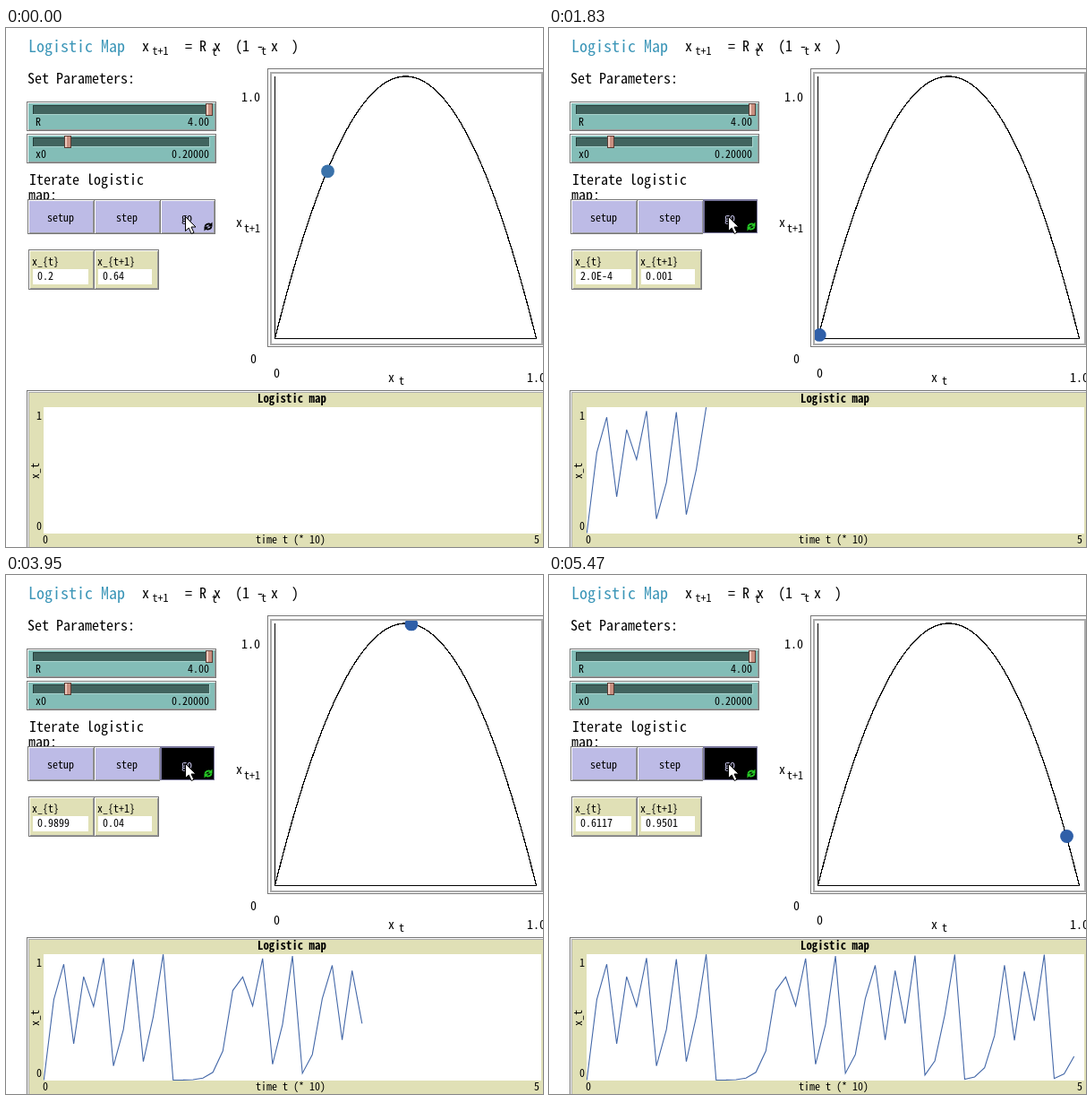
An HTML page that plays this animation: 600 px wide and 579 px high, repeating every 5.54 s.

```html
<!DOCTYPE html>
<html lang="en">
<head>
<meta charset="utf-8">
<title>Logistic map</title>
<style>
  html, body { margin: 0; width: 100%; height: 100%; overflow: hidden; background: #fff; }
  svg { display: block; width: 600px; height: 579px; }
  text { white-space: pre; }
  rect, .crisp { shape-rendering: crispEdges; }
</style>
</head>
<body>
<svg id="stage" viewBox="0 0 600 579"></svg>
<script>
const LOOP = 5540, PRESS = 330, CATCH_UP = 4640;
const FONT = '"Noto Sans Mono CJK SC", "Liberation Mono", monospace';

const f = x => 4 * x * (1 - x);
const xs = [0.2];
while (xs.length < 53) xs.push(f(xs[xs.length - 1]));

const viewX = x => 300.5 + 292 * x;
const viewY = y => 346.5 - 292.5 * y;
const plotX = t => 42.3 + 11.11 * t;
const plotY = y => 563.5 - 140.3 * y;

// Advance of one character, in em
const pen = document.createElement('canvas').getContext('2d');
pen.font = '100px ' + FONT;
const advance = pen.measureText('0').width / 100;

const rect = (x, y, w, h, fill, more = '') =>
  `<rect x="${x}" y="${y}" width="${w}" height="${h}" fill="${fill}" ${more}/>`;
const text = (x, y, s, charW = 6, more = '') =>
  `<text x="${x}" y="${y}" font-size="${charW / advance}" ${more}>${s}</text>`;
const panel = (x, y, w, h, fill) =>
  rect(x, y, w, h, '#777') + rect(x + 1, y + 1, w - 2, h - 2, '#fff') +
  rect(x + 2, y + 2, w - 3, h - 3, '#999') + rect(x + 2, y + 2, w - 4, h - 4, fill);

const slider = (y, name, value, thumb) =>
  panel(23, y, 212, 33, '#83bdb7') +
  rect(30, y + 4, 198, 11, '#a9d3ce') + rect(30, y + 4, 197, 10, '#243c39') +
  rect(31, y + 5, 196, 9, '#41645f') +
  rect(thumb, y + 2, 8, 14, '#573b34') + rect(thumb + 1, y + 3, 6, 12, '#c98f80') +
  rect(thumb + 1, y + 3, 2, 12, '#edc9bd') +
  text(33, y + 27, name) + text(227, y + 27, value, 6, 'text-anchor="end"');

const button = (x, w, label, labelX) =>
  panel(x, 191, w, 39, '#bdbbe6') + text(labelX, 216, label);

const monitor = (x, w, label, id, fieldW) =>
  panel(x, 247, w, 45, '#e0e0b6') + text(x + 4, 265, label) +
  rect(x + 5, 269, fieldW, 17, '#fff') + text(x + 10, 281, '', 6, `id="${id}"`);

const arrow = '<path d="M222.5 221.500a4 3.500 0 0 1 6-2.500" fill="none" stroke-width="1.8"/>' +
  '<path d="M230.500 216.500v5h-5z" stroke="none"/>';

let curve = '';
for (let i = 0; i <= 100; i++) curve += `${viewX(i / 100)},${viewY(f(i / 100))} `;

const stage = document.getElementById('stage');
stage.style.fontFamily = FONT;
stage.innerHTML =
  rect(0, 0, 600, 579, '#fff') +
  text(25, 27, 'Logistic Map', 9, 'fill="#3c96b8"') +
  text(152, 26, 'x', 8) + text(163.5, 30, 't+1') + text(200, 26, '= R', 8) +
  text(230, 31, 't') + text(232, 26, 'x', 8) + text(256, 26, '(1', 8) +
  text(280, 26, '-', 8) + text(285, 30, 't') + text(296, 26, 'x', 8) + text(319, 26, ')', 8) +
  text(24, 62, 'Set Parameters:', 8) +
  slider(82, 'R', '4.00', 223) + slider(118, 'x0', '0.20000', 65) +
  text(26, 175, 'Iterate logistic', 8) + text(25, 192, 'map:', 8) +
  button(24, 75, 'setup', 46) + button(98, 75, 'step', 123) + button(172, 62, '', 196) +
  `<g id="pressed">${rect(172, 191, 62, 39, '#fff')}${rect(172, 191, 61, 38, '#77759a')}
    ${rect(174, 193, 58, 35, '#000')}</g>` +
  text(196, 216, 'go', 6, 'id="go"') +
  `<g id="cycle">${arrow}<g transform="rotate(180 226 221.5)">${arrow}</g></g>
  <path d="M200.5 210.500v16l3.700-3.500 3 6.500 2.800-1.300-3-6.200h5z" fill="#fff" stroke="#000"/>` +
  monitor(25, 74, 'x_{t}', 'now', 62) + monitor(98, 73, 'x_{t+1}', 'next', 60) +

  // view with the parabola
  rect(292, 45, 308, 311, '#777') + rect(293, 46, 307, 309, '#fff') +
  rect(295, 49, 305, 305, '#aaa') + rect(297, 51, 301, 301, '#fff') +
  `<path class="crisp" d="M300.5 54V346.500H593" fill="none" stroke="#000"/>
  <polyline class="crisp" points="${curve}" fill="none" stroke="#000" stroke-width="1.3"/>
  <clipPath id="view"><rect x="297" y="51" width="301" height="301"/></clipPath>
  <g clip-path="url(#view)"><circle id="dot" r="7.4"/></g>` +
  text(263, 82, '1.0', 7) + text(257, 222, 'x', 7) + text(266, 228, 't+1') +
  text(273, 374, '0', 7) + text(299, 390, '0', 7) +
  text(427, 395, 'x', 7) + text(439, 398, 't') + text(582, 395, '1.0', 7) +

  // time plot
  rect(23, 404, 577, 175, '#777') + rect(24, 405, 576, 174, '#fff') +
  rect(25, 406, 575, 173, '#aaa') + rect(26, 407, 574, 172, '#e0e0b6') +
  rect(42, 423, 556, 141, '#fff') +
  text(281, 418, 'Logistic map', 6.4, 'font-weight="bold"') +
  text(34, 437, '1') + text(34, 560, '0') + text(41, 575, '0') +
  text(279, 575, 'time t (* 10)') + text(590, 575, '5') +
  text(0, 0, 'x_t', 6, 'transform="translate(37 503) rotate(-90)"') +
  `<clipPath id="area"><rect x="42" y="423" width="556" height="141"/></clipPath>
  <polyline id="trace" clip-path="url(#area)" fill="none" stroke="#4468a8" stroke-width="1.1"/>`;

const el = {};
for (const id of ['pressed', 'go', 'cycle', 'now', 'next', 'dot', 'trace']) el[id] = document.getElementById(id);

function format(x) {
  const r = Math.round(x * 1e4) / 1e4;
  return r > 0 && r < 0.001 ? (r * 1e4).toFixed(1) + 'E-4' : String(r);
}

function draw(t) {
  const on = t >= PRESS;
  const steps = on ? (t - 311) / 101.1 : 0;
  // The readouts slowly fall behind the dot, then catch up
  const lag = t < CATCH_UP ? 0.6 + 0.00036 * t : 0.4;
  const x = xs[Math.floor(steps)], k = Math.max(0, Math.floor(steps - lag));

  el.pressed.setAttribute('visibility', on ? 'visible' : 'hidden');
  el.go.setAttribute('fill', on ? '#c4c2e8' : '#000');
  el.cycle.setAttribute('stroke', on ? '#25c925' : '#000');
  el.cycle.setAttribute('fill', on ? '#25c925' : '#000');
  el.now.textContent = format(xs[k]);
  el.next.textContent = format(xs[k + 1]);
  el.dot.setAttribute('cx', viewX(x) + 0.6);
  el.dot.setAttribute('cy', viewY(f(x)) + 0.5);
  el.dot.setAttribute('fill', on ? '#2f5fa8' : '#3a72aa');
  el.trace.setAttribute('points',
    xs.slice(0, k).map((v, i) => `${plotX(i)},${plotY(i ? v : 0)}`).join(' '));
}

const start = performance.now();
function loop(now) {
  draw(Math.max(0, now - start) % LOOP);
  requestAnimationFrame(loop);
}
draw(0);
requestAnimationFrame(loop);
</script>
</body>
</html>
```
